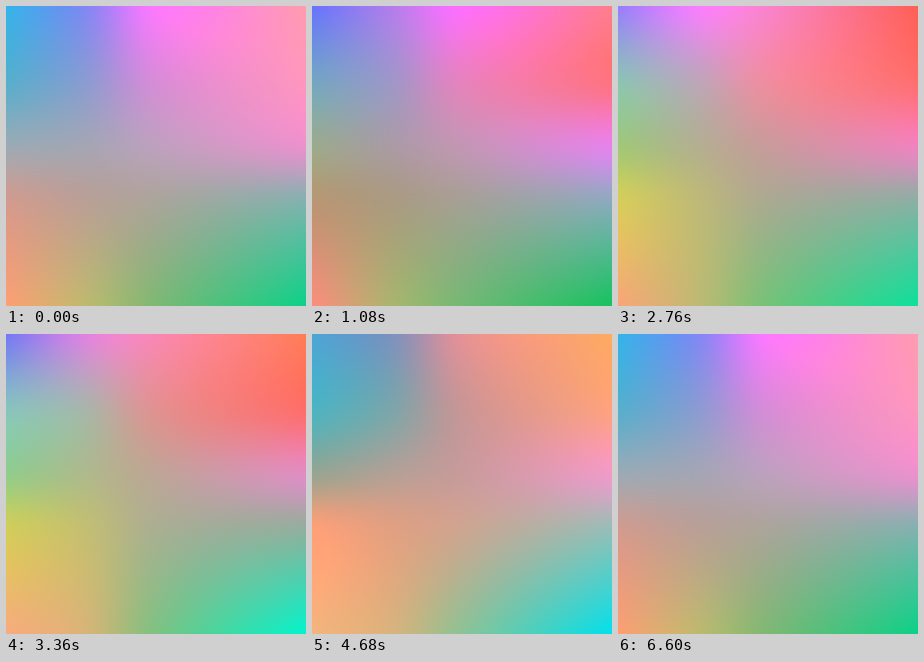
Write an HTML page with a canvas that moves like this. It is 300x300 px and loops after 6.72 s.

```html
<!DOCTYPE html>
<html lang="en">
<head>
<meta charset="utf-8">
<title>Drifting gradient mesh</title>
<style>
  html, body { margin: 0; width: 100%; height: 100%; overflow: hidden; }
  canvas { display: block; width: 100vw; height: 100vh; }
</style>
</head>
<body>
<canvas width="300" height="300"></canvas>
<script>
const SIZE = 300, LOOP = 6720, STEP = 120;
const columns = [0, 80, 150, 300];
const rows = [0, 75, 140, 195, 300];

// Colours of the mesh points, row by row, at each key time.
const keys = [
  [0, `32b4eb 8287f5 ff78ff ff9baf
       55afcd 8c9bd2 d78cd7 ff96be
       9baab4 a5a5b4 bea0be eb91cd
       d29b8e b9a096 aaa59b 82b2af
       ff9e72 beb96e 7db973 0ad287`],
  [1080, `6473ff b47cee ff6eff ff7d8c
       73a5c3 a096c8 e682be ff737f
       9baa8c aa9ba5 c396b4 e682eb
       b99673 aa9b82 a5a096 8caabe
       ff8c7d aab46e 73b973 14c35f`],
  [1920, `af96ff fa7dff ff7de6 ff6e6e
       96c8c8 bea5c3 e191af ff7378
       a5b982 b4a591 c39ba0 f082dc
       c8b45f b9af6e a5aa87 8caab4
       ff9b73 aabe6e 7dbe73 0fc864`],
  [2760, `967dff fa7dff fa82cd ff5f55
       8cc3b4 bea5b9 f08ca0 ff6e6e
       a0c878 b4af91 c89b9b f082be
       d7cd5a beb978 aaaa91 8cafa5
       faa578 beb973 73c378 0ae19b`],
  [3360, `7378f5 e182e1 fa87b4 ff7d55
       87c3be aab4aa e19191 ff6e69
       91cd8c afb98c bea596 e18cc3
       d2cd5a c3be73 aaaf91 91afa0
       faaa7d d7b478 7dc382 00f5cd`],
  [4680, `4ba5d7 7d91be e69196 ffaa5f
       4bb4c3 7da5aa c89696 ffa27e
       96a591 b4a096 c89b9b f09bc8
       ffa078 e1a082 cda591 96beb9
       f5b47d d7b47d 8cc396 00e1eb`]
].map(([time, colors]) => ({
  time,
  mesh: colors.split(/\s+/).map(hex =>
    [0, 2, 4].map(i => parseInt(hex.slice(i, i + 2), 16)))
}));
keys.push({ time: 6600, mesh: keys[0].mesh });

// Cubic Hermite curve through unevenly spaced knots.
function spline(knots, values, p) {
  const last = knots.length - 1;
  let i = 0;
  while (i < last - 1 && p >= knots[i + 1]) i++;
  const slope = k => {
    const a = Math.max(k - 1, 0), b = Math.min(k + 1, last);
    return (values[b] - values[a]) / (knots[b] - knots[a]);
  };
  const h = knots[i + 1] - knots[i], t = (p - knots[i]) / h, u = 1 - t;
  return u * u * (1 + 2 * t) * values[i] + t * t * (3 - 2 * t) * values[i + 1]
       + h * t * u * (u * slope(i) - t * slope(i + 1));
}

// Influence of every knot on every pixel along one axis.
const influence = knots => Array.from({ length: SIZE }, (_, p) =>
  knots.map((_, k) => spline(knots, knots.map((_, j) => +(j === k)), p + 0.5)));
const acrossX = influence(columns), acrossY = influence(rows);

function meshAt(time) {
  let i = 0;
  while (i < keys.length - 2 && time >= keys[i + 1].time) i++;
  const from = keys[i], to = keys[i + 1];
  const t = Math.min(1, (time - from.time) / (to.time - from.time));
  return from.mesh.map((color, p) =>
    color.map((v, c) => v + (to.mesh[p][c] - v) * t));
}

const ctx = document.querySelector("canvas").getContext("2d");
const image = ctx.createImageData(SIZE, SIZE);
image.data.fill(255);

function draw(time) {
  const mesh = meshAt(time);
  for (let y = 0, at = 0; y < SIZE; y++) {
    const line = columns.map((_, col) => [0, 1, 2].map(c =>
      acrossY[y].reduce((sum, w, row) =>
        sum + w * mesh[row * columns.length + col][c], 0)));
    for (let x = 0; x < SIZE; x++, at += 4) {
      const w = acrossX[x];
      for (let c = 0; c < 3; c++) {
        image.data[at + c] = w[0] * line[0][c] + w[1] * line[1][c]
                           + w[2] * line[2][c] + w[3] * line[3][c];
      }
    }
  }
  ctx.putImageData(image, 0, 0);
}

let shown = -1;
const start = performance.now();
function tick() {
  const elapsed = Math.max(0, performance.now() - start) % LOOP;
  const time = Math.floor(elapsed / STEP) * STEP;
  if (time !== shown) draw(shown = time);
  requestAnimationFrame(tick);
}
tick();
</script>
</body>
</html>
```
